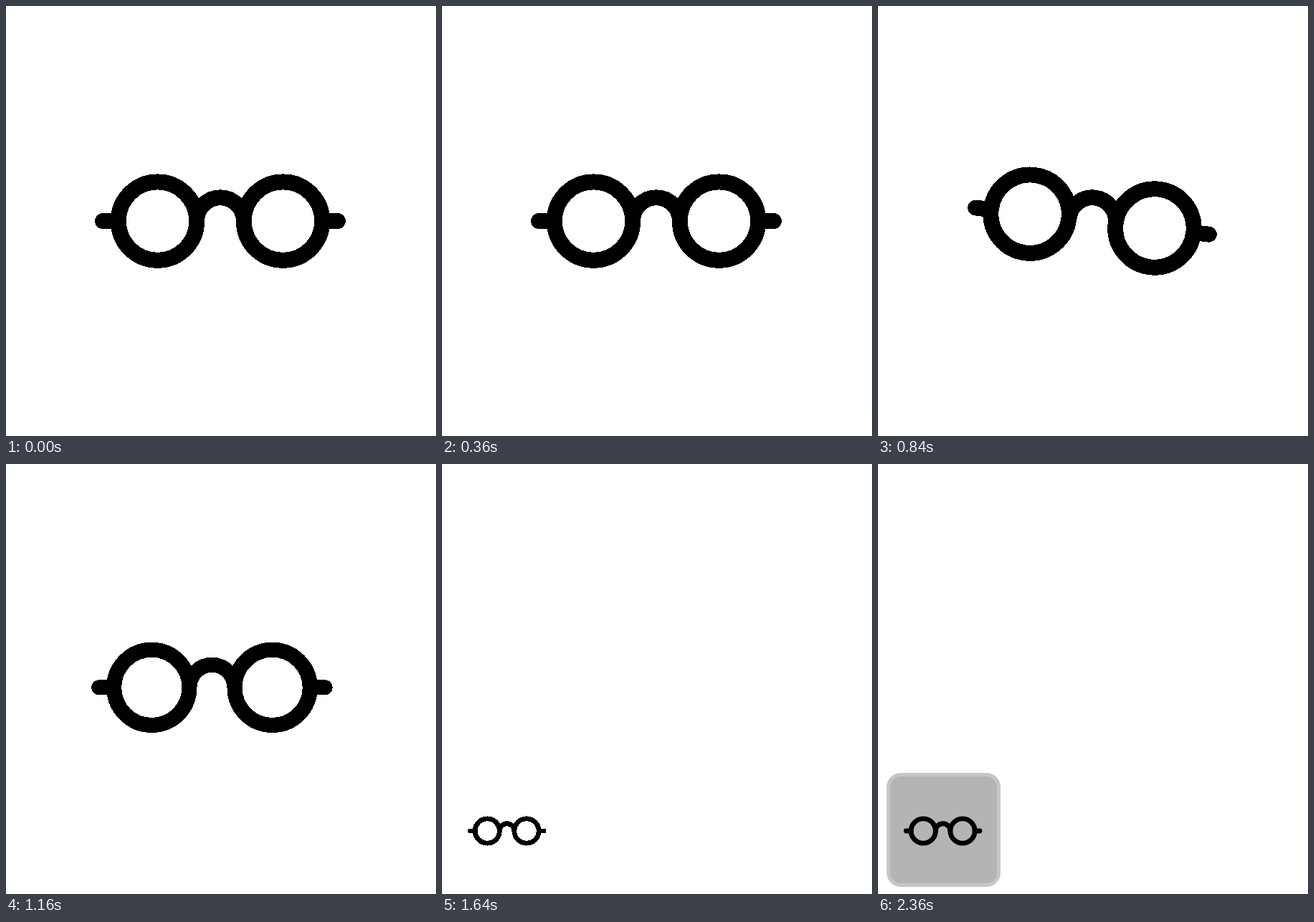
Write an HTML page that moves like this. It is 600x600 px and loops after 3.4 s.

```html
<!DOCTYPE html>
<html lang="en">
<head>
<meta charset="utf-8">
<title>Glasses</title>
<style>
  html, body { margin: 0; height: 100%; overflow: hidden; background: #fff; }
  svg { display: block; width: 100vw; height: 100vh; }
</style>
</head>
<body>
<svg id="stage" viewBox="0 0 600 600">
  <clipPath id="wheel"><path id="sector"/></clipPath>
  <g id="tile" clip-path="url(#wheel)">
    <rect x="14.5" y="433.5" width="154" height="154" rx="17.5" fill="#b4b4b4" stroke="#c6c6c6" stroke-width="5"/>
  </g>
  <g id="glasses" fill="none" stroke="#000" stroke-width="21.9" stroke-linecap="round">
    <circle cx="-87.5" r="54.7"/>
    <circle cx="87.5" r="54.7"/>
    <path d="M-164 0H-142.2M142.2 0H164M-32.8 0A32.8 32.8 0 0 1 32.8 0"/>
  </g>
</svg>
<script>
const LOOP = 3400, STEP = 40;
const SWING = [0, 13, -13, 13, 0], SWING_STEP = 240;
const MOVE_START = 1080, MOVE_END = 1640, WHEEL_END = 2360;
const HUB = { x: 91.5, y: 510.5, r: 150 };

const $ = id => document.getElementById(id);
const lerp = (a, b, p) => a + (b - a) * p;
const smooth = u => u * u * (3 - 2 * u);
const progress = (t, from, to) => Math.min(1, Math.max(0, (t - from) / (to - from)));

function swingAngle(t) {
  const i = Math.floor(t / SWING_STEP);
  if (i >= SWING.length - 1) return 0;
  return lerp(SWING[i], SWING[i + 1], smooth(t / SWING_STEP - i));
}

function rim(degrees) {
  const a = degrees * Math.PI / 180;
  return `${HUB.x + HUB.r * Math.sin(a)} ${HUB.y - HUB.r * Math.cos(a)}`;
}

function drawWheel(u) {
  $('tile').style.display = u > 0 ? '' : 'none';
  if (u === 1) {
    $('sector').setAttribute('d', 'M0 0H600V600H0Z');
    return;
  }
  const end = 360 * (u + 0.228 * u * (1 - u));
  $('sector').setAttribute('d',
    `M${HUB.x} ${HUB.y}L${rim(-1.4)}A${HUB.r} ${HUB.r} 0 ${+(end > 178.6)} 1 ${rim(end)}Z`);
}

function draw(t) {
  const p = smooth(progress(t, MOVE_START, MOVE_END));
  const x = lerp(299, 90.6, p), y = lerp(300.1, 512, p), scale = lerp(1, 0.313, p);
  $('glasses').setAttribute('transform',
    `translate(${x} ${y}) rotate(${swingAngle(t)}) scale(${scale})`);
  drawWheel(progress(t, MOVE_END, WHEEL_END));
  $('stage').setAttribute('shape-rendering', t < WHEEL_END ? 'crispEdges' : 'auto');
}

const start = performance.now();
function tick() {
  const t = (performance.now() - start) % LOOP;
  draw(Math.floor(t / STEP) * STEP);
  requestAnimationFrame(tick);
}
tick();
</script>
</body>
</html>
```
